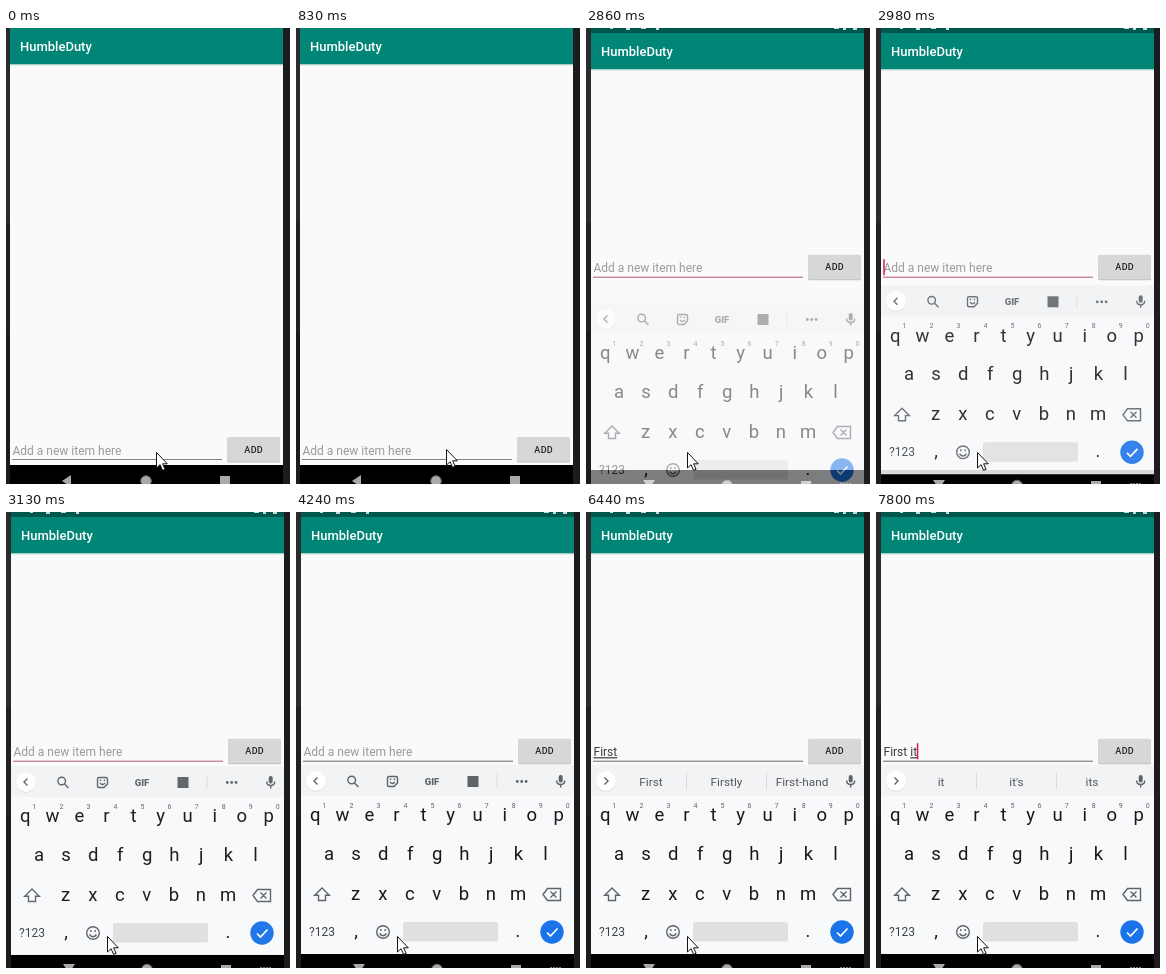
Recreate the animation shown at these times as an HTML page. Size 284 by 456 pixels, loop 8000 ms.

```html
<!DOCTYPE html>
<html lang="en">
<head>
<meta charset="utf-8">
<style>
html, body { margin: 0; height: 100%; overflow: hidden; background: #1b1c1e; }
svg { display: block; }
text { font: 12px Roboto, sans-serif; white-space: pre; }
.mid { text-anchor: middle; }
.title { font-size: 13px; font-weight: 500; fill: #fff; }
.add { font-size: 9px; font-weight: 500; letter-spacing: .3px; fill: #222; }
.hint { fill: #9b9b9b; }
.key { font-size: 18.5px; fill: #17181a; }
.digit { font-size: 7px; fill: #5f6368; }
.word { font-size: 11.8px; fill: #55585c; }
.gif { font-size: 9.5px; font-weight: 900; fill: #5f6368; }
.line { fill: none; stroke: #5f6368; stroke-width: 1.4; }
#composing { text-decoration: underline; }
</style>
</head>
<body>
<svg width="284" height="456" viewBox="0 0 284 456">
  <path fill="#2a2b2d" d="M0 0h5v195H0z"/>
  <path fill="#202124" d="M0 195h5v110H0z"/>

  <g id="screen">
    <path fill="#fafafa" d="M4 0h273v437H4z"/>
    <path fill="#008577" d="M4 0h273v36.5H4z"/>
    <path fill="#cfdedc" d="M4 36.5h273v1H4z"/>
    <text class="title" x="14" y="23">HumbleDuty</text>
  </g>

  <g id="status">
    <path fill="#00574b" d="M5 0h273v5H5z"/>
    <path fill="#c5d9d6" d="M24 0h3v1h-3zM40 0h4v2h-4zM55 0h5v1h-5zM70 0h3v2h-3zM248 0h5v1h-5zM257 0h3v2h-3zM267 0h4v2h-4z"/>
  </g>

  <g id="entry">
    <text class="hint" id="hint" x="6.5" y="426.5">Add a new item here</text>
    <text id="typed" x="6.5" y="426.5" fill="#3c3c3c"><tspan id="done"></tspan><tspan id="composing"></tspan></text>
    <path id="rule" d="M6 431.5h210" stroke="#858585"/>
    <rect x="221" y="410" width="53" height="24.5" rx="1.5" fill="#bfc0c0"/>
    <rect x="221" y="409" width="53" height="24.5" rx="1.5" fill="#d6d7d7"/>
    <text class="add mid" x="247.7" y="424.7">ADD</text>
    <path id="caret" d="M0 413.5v16" stroke="#d81b60" stroke-width="1.5"/>
  </g>

  <g id="navClosed" fill="#a9a9a9">
    <path fill="#000" d="M4 437h273v19H4z"/>
    <path d="M65 447v12l-9-6z"/>
    <circle cx="140" cy="453" r="5.3" stroke="#666"/>
    <path d="M214 448h10v10h-10z"/>
  </g>
  <g id="navOpen" fill="#a9a9a9">
    <path fill="#000" d="M5 442h273v14H5z"/>
    <path d="M57 452h12l-6 9z"/>
    <circle cx="141" cy="457.5" r="5.3" stroke="#666"/>
    <path d="M215 453h10v10h-10z"/>
    <path fill="#777" d="M254 455h2v1h-2zM257 455h2v1h-2zM260 455h2v1h-2zM263 455h2v1h-2z"/>
  </g>

  <g id="keyboard">
    <path fill="#f8f9fb" d="M5 253h273v189H5z"/>
    <path fill="#f1f3f4" d="M5 253h273v31H5z"/>
    <circle cx="20" cy="269.7" r="10.2" fill="#dfe1e3"/>
    <circle cx="20" cy="269" r="10" fill="#fff"/>
    <path id="chevron" class="line"/>
    <g id="tools">
      <circle class="line" cx="55.7" cy="268" r="3.8"/>
      <path class="line" d="M58.5 271l4 4"/>
      <path class="line" d="M93 264.5h7q1.5 0 1.5 1.5v5l-3.5 3.5h-5q-1.5 0-1.5-1.5v-7q0-1.5 1.5-1.5zM94 270q2.500 3 5 0M94.500 266.500v1.500M98.500 266.500v1.500"/>
      <text class="gif mid" x="136" y="272.7">GIF</text>
      <path fill="#5f6368" d="M171.500 264h11v11h-11z"/>
      <path fill="#dcdee0" d="M200.500 262h1v14h-1z"/>
      <g fill="#5f6368"><circle cx="221.300" cy="269.500" r="1.400"/><circle cx="225.700" cy="269.500" r="1.400"/><circle cx="230.100" cy="269.500" r="1.400"/></g>
    </g>
    <g id="words">
      <path fill="#d8dadd" d="M100 261h1v16h-1zM180 261h1v16h-1z"/>
      <text class="word mid" x="65" y="274"></text>
      <text class="word mid" x="140.500" y="274"></text>
      <text class="word mid" x="216" y="274"></text>
    </g>
    <rect x="262.700" y="263" width="4" height="7.500" rx="2" fill="#5f6368"/>
    <path class="line" stroke-width="1.200" d="M260.700 268.500q0 4 4 4t4-4M264.700 272.500v3"/>

    <g id="keys"></g>
    <path class="line" d="M26 376l7.300 7.300h-3.800v5.200h-7v-5.200h-3.800z"/>
    <path class="line" d="M247 382.500l4.500-6H264.500v12H251.500zM254.500 379.500l6 6M260.500 379.500l-6 6"/>
    <text class="mid" x="26" y="424" fill="#3c4043">?123</text>
    <circle class="line" cx="87" cy="420" r="6.300"/>
    <path class="line" d="M83.500 421.500q3.500 4.500 7 0M84.800 417v2M89.200 417v2"/>
    <rect x="107" y="410" width="95" height="19.500" rx="2" fill="#dfe1e1"/>
    <circle cx="256" cy="420" r="11.700" fill="#1a73e8"/>
    <path d="M251 420.500l3.500 3.500 7-7.500" fill="none" stroke="#fff" stroke-width="1.700"/>
  </g>

  <path id="pointer" d="M.5 .5v15.500l3.600-3.300 2.500 5.700 2.500-1.100-2.500-5.500h4.700z" fill="#fff" stroke="#111"/>
</svg>

<script>
const LOOP = 8000, OPEN_AT = 2860;
const $ = id => document.getElementById(id);
const show = (id, on) => $(id).style.display = on ? '' : 'none';
const move = (id, x, y) => $(id).setAttribute('transform', `translate(${x} ${y})`);
const latest = (steps, t) => steps.findLast(step => step[0] <= t);

// time, x, y
const pointerSteps = [
  [0, 150, 424], [680, 150, 423], [830, 150, 421], [1390, 154, 423], [1510, 174, 429],
  [1630, 200, 438], [1750, 227, 448], [1870, 230, 470], [OPEN_AT, 101, 424]
];
// time, keyboard drop, opacity
const slideSteps = [[0, 0, 0], [OPEN_AT, 22, .5], [2980, 4.3, .88], [3130, 1, .97], [3250, 0, 1]];
// time, finished text, text being composed, suggestions
const typingSteps = [
  [0, '', '', ''],
  [4740, '', 'F', 'F For From'],
  [5200, '', 'Fi', 'Fi Find First'],
  [5450, '', 'Fir', 'Fir First Fire'],
  [5760, '', 'Firs', 'Firs First Firsts'],
  [6040, '', 'First', 'First Firstly First-hand'],
  [6720, 'First ', '', 'of thing time'],
  [7550, 'First ', 'i', 'I in is'],
  [7800, 'First ', 'it', "it it's its"]
];
const caretSteps = [
  [0, false], [2980, true], [3130, false], [3810, true], [4240, false],
  [4740, true], [6440, false], [6720, true], [7120, false], [7550, true]
];

function addKeys(letters, x, y, digits = '') {
  [...letters].forEach((letter, i) => {
    const keyX = x + i * 27.05;
    $('keys').innerHTML += `<text class="key mid" x="${keyX}" y="${y}">${letter}</text>` +
      (digits ? `<text class="digit mid" x="${keyX + 9}" y="296">${digits[i]}</text>` : '');
  });
}
addKeys('qwertyuiop', 19.3, 309.3, '1234567890');
addKeys('asdfghjkl', 33, 348);
addKeys('zxcvbnm', 59.7, 387.5);
addKeys(',', 60, 425);
addKeys('.', 222, 425);

const wordSlots = document.querySelectorAll('.word');

function render(t) {
  const open = t >= OPEN_AT;
  const [, x, y] = latest(pointerSteps, t);
  const [, drop, opacity] = latest(slideSteps, t);
  const [, done, composing, suggestions] = latest(typingSteps, t);

  move('screen', open ? 1 : 0, open ? 5 : 0);
  move('entry', open ? 1 : 0, open ? -182.3 : 0);
  move('pointer', x, y);
  move('keyboard', 0, drop);
  $('keyboard').setAttribute('opacity', opacity);
  for (const id of ['status', 'navOpen', 'keyboard']) show(id, open);
  show('navClosed', !open);

  $('done').textContent = done;
  $('composing').textContent = composing;
  show('hint', !done && !composing);
  show('tools', !suggestions);
  show('words', suggestions);
  suggestions.split(' ').forEach((word, i) => wordSlots[i].textContent = word);
  $('chevron').setAttribute('d', suggestions ? 'M18.5 265.5l3.5 3.5-3.5 3.5' : 'M21.500 265.500l-3.500 3.500 3.500 3.500');

  $('rule').setAttribute('stroke', !open ? '#858585' : t < 3250 ? '#b8547f' : '#6b6468');
  show('caret', latest(caretSteps, t)[1]);
  move('caret', 7 + $('typed').getComputedTextLength(), 0);
}

function frame() {
  render(performance.now() % LOOP);
  requestAnimationFrame(frame);
}
frame();
</script>
</body>
</html>
```
